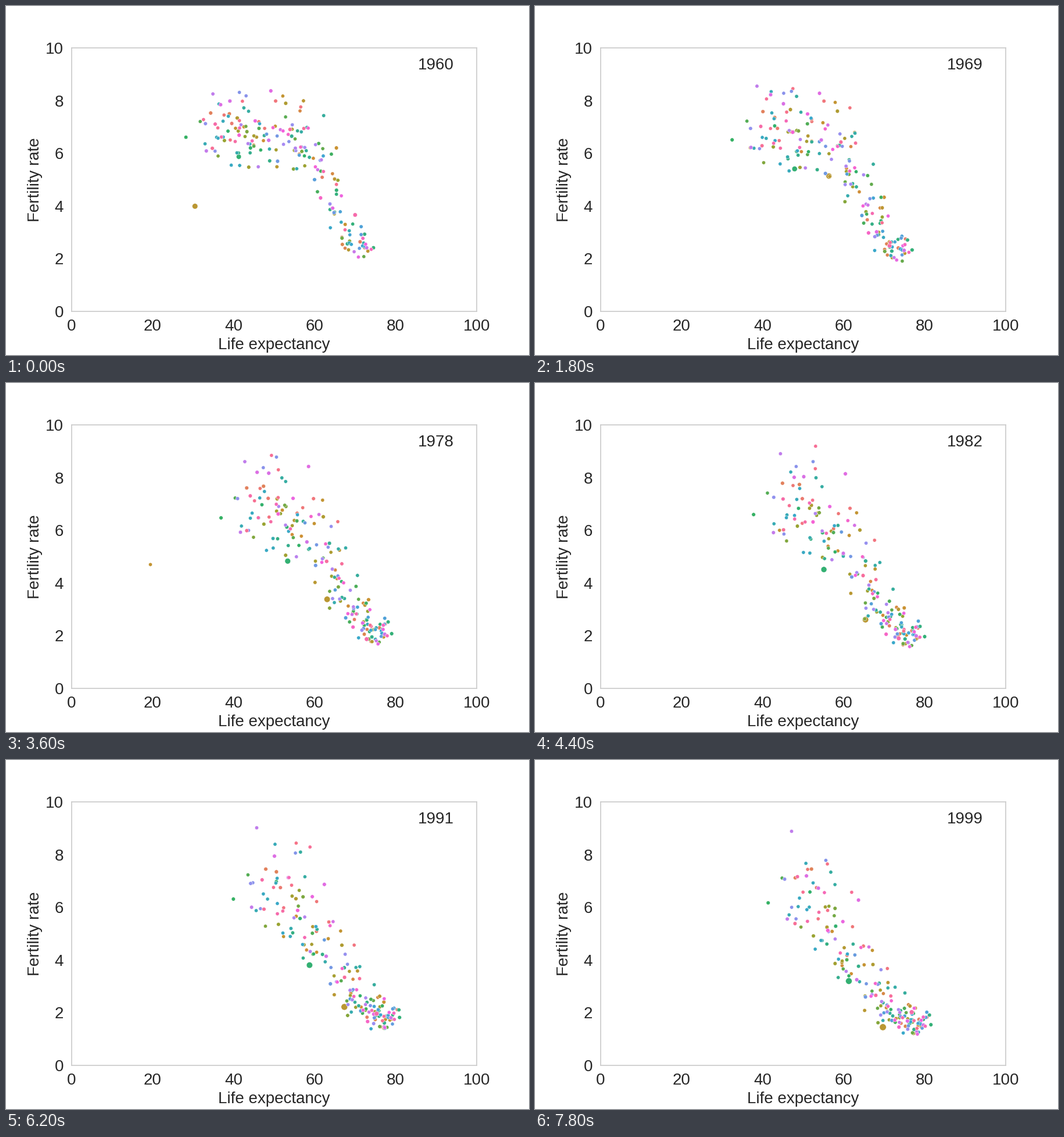
A matplotlib script for the animation above (8000 ms loop, 900 by 600 pixels).

```python
import numpy as np
import matplotlib.pyplot as plt
from matplotlib.animation import FuncAnimation
from matplotlib.colors import to_rgb

plt.rcParams.update({
    "font.family": "Liberation Sans", "font.size": 20,
    "text.color": ".15", "axes.labelcolor": ".15",
    "xtick.color": ".15", "ytick.color": ".15",
    "axes.edgecolor": ".8", "axes.linewidth": 1.25,
})

FIRST, YEARS, COUNT = 1960, 40, 182
WHEEL = ["#f77189", "#ce9032", "#97a431", "#32b166",
         "#36ada4", "#39a7d0", "#a48cf4", "#f561dd"]

rng = np.random.default_rng(12)
t = np.arange(YEARS)
p = t / (YEARS - 1)


def mix(a, b, f):
    return a + (b - a) * f


def hue_color(hue):
    """Blend between neighbours on the colour wheel."""
    k, f = divmod(hue * len(WHEEL), 1)
    a, b = (np.array(to_rgb(WHEEL[int(k + d) % len(WHEEL)])) for d in (0, 1))
    return mix(a, b, f)


def drifting():
    """A normal score that wanders a little over the years."""
    wave = .16 * np.sin(.3 * t + rng.uniform(0, 2 * np.pi))
    return np.clip(rng.normal(), -2, 2) + wave


def life(rank):
    """Life expectancy by rank: fast gains first, then a slowdown."""
    start = 73 - 40 * (1 - rank) ** 1.1
    end = 79 - 33.5 * (1 - rank) ** 1.7
    return mix(start, end, 1 - (1 - p) ** 1.7)


def fertility(x):
    """Falling S-curve over life expectancy that flattens with time."""
    center = 64 - p + 8 * p * (1 - p)
    width = mix(2.2, 5.5, p)
    return mix(2.25, 1.2, p) + mix(4.5, 5.6, p) / (1 + np.exp((x - center) / width))


def country(rank, hue):
    trend = life(rank)
    x = trend + (3 - 1.7 * rank) * drifting()
    y = fertility(trend) * np.exp(mix(.1, .16, p) * drifting())
    return hue, x, y, np.full(YEARS, 20 + 4 * rng.random() ** 4)


def landmark(hue, s0, s1, *path):
    """A dot led through a few (year, life expectancy, fertility) points."""
    keys, xs, ys = zip(*path)
    return (hue, np.interp(t, keys, xs), np.interp(t, keys, ys),
            np.linspace(s0, s1, YEARS))


hues = (rng.permutation(COUNT) + .5) / COUNT
dots = [country((i + .5) / COUNT, hue) for i, hue in enumerate(hues)]
dots += [
    landmark(.17, 47, 68, (0, 30.5, 3.99), (2, 49.9, 6), (4, 52, 6.12),
             (14, 60.8, 4.15), (22, 65.4, 2.61), (28, 66.5, 2.63),
             (35, 68.5, 1.67), (39, 69.7, 1.45)),
    landmark(.40, 38, 62, (0, 41.3, 5.87), (14, 51.6, 5.15),
             (28, 57.8, 4.03), (39, 61.3, 3.2)),
    landmark(.95, 28, 32, (0, 70, 3.66), (14, 72.1, 1.84), (39, 76.8, 2.02)),
    landmark(.15, 20, 20, (0, 40.5, 6.95), (14, 35, 5.8), (15, 18.2, 5.4),
             (18, 19.5, 4.7), (19, 37, 5.2), (22, 44.2, 6), (39, 59.6, 3.9)),
    landmark(.72, 20, 20, (0, 43.1, 8.18), (22, 48.3, 8.42), (33, 44, 6.6),
             (34, 13.2, 6.4), (35, 43.8, 6.3), (39, 47.2, 6)),
    landmark(.98, 20, 20, (0, 32.6, 7.28), (22, 53.1, 9.19),
             (28, 57.7, 8.93), (39, 62, 6.57)),
]
dots.sort(key=lambda d: d[0])
xs, ys, sizes = (np.array([d[i] for d in dots]) for i in (1, 2, 3))

fig = plt.figure(figsize=(9, 6), dpi=100, facecolor="white")
ax = fig.add_axes([.125, .125, .775, .755])
ax.set(xlim=(0, 100), ylim=(0, 10),
       xlabel="Life expectancy", ylabel="Fertility rate")
ax.tick_params(left=False, bottom=False, length=6, pad=3.5)

scatter = ax.scatter(xs[:, 0], ys[:, 0], s=sizes[:, 0],
                     c=[hue_color(d[0]) for d in dots],
                     edgecolors="white", linewidths=.36)
label = ax.text(90, 9.19, str(FIRST), ha="center", va="baseline")


def draw(i):
    scatter.set_offsets(np.column_stack([xs[:, i], ys[:, i]]))
    scatter.set_sizes(sizes[:, i])
    label.set_text(str(FIRST + i))
    return scatter, label


anim = FuncAnimation(fig, draw, frames=YEARS, interval=200,
                     init_func=lambda: draw(0), repeat=True, repeat_delay=0)
plt.show()
```
